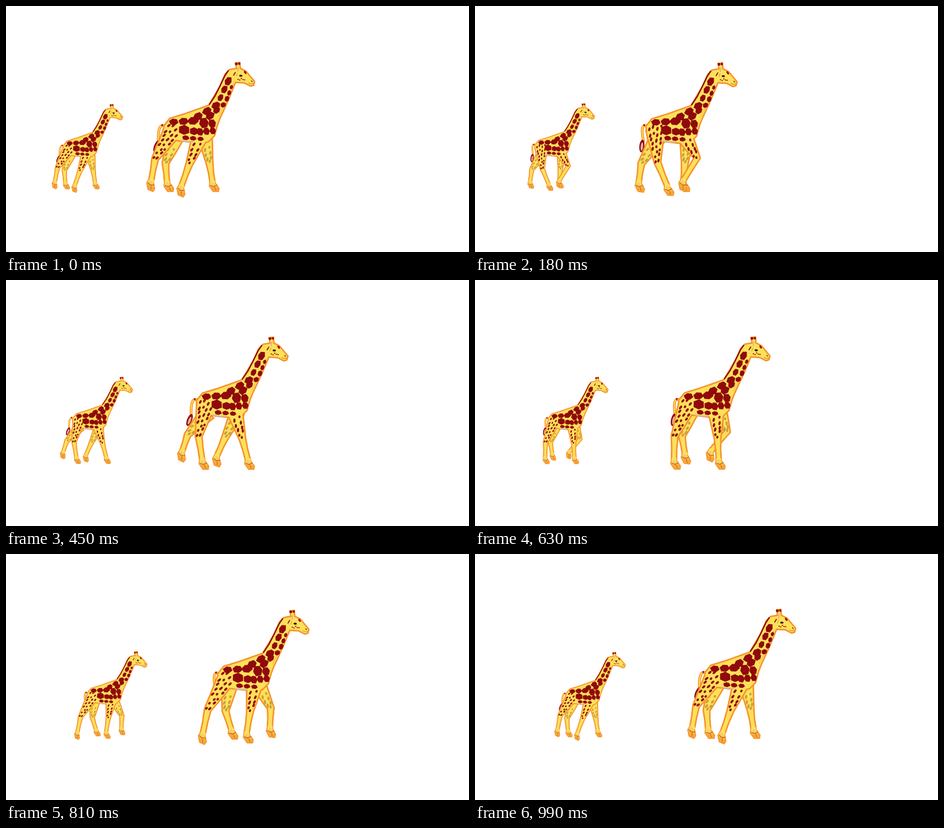
Recreate the animation shown at these times as an HTML page with a canvas. Size 842x448 px, loop 1.08 s.

```html
<!DOCTYPE html>
<html lang="en">
<head>
<meta charset="utf-8">
<title>Walking giraffes</title>
<style>
html, body { margin: 0; width: 100%; height: 100%; overflow: hidden; background: #fff; }
canvas { display: block; }
</style>
</head>
<body>
<canvas id="stage" width="842" height="448"></canvas>
<script>
const ctx = document.getElementById('stage').getContext('2d');
const STEP = 90, STEPS = 12, STRIDE = 11, STANCE = 7;
const YELLOW = '#fde05a', ORANGE = '#f6922b', RED = '#900a0c', DIM = '#c9a040', SHADE = '#f9bd45';
const { PI, sin, cos, atan2, hypot, max, min } = Math;

// Silhouette of head, neck and torso, clockwise from the horns.
const BODY = [
  [416, 103], [426, 102], [427, 113], [437, 118], [453, 137], [451, 145], [445, 147], [433, 141],
  [418, 140], [405, 172], [390, 205], [385, 218], [380, 237], [369, 248], [356, 251], [320, 247],
  [290, 244], [286, 218], [297, 204], [326, 195], [368, 180], [388, 146], [398, 123], [406, 115], [418, 113]];

const mix = (a, b, k) => a + (b - a) * k;
const noise = n => { const v = sin(n * 12.9898 + 4) * 43758.5453; return (v - Math.floor(v)) * 2 - 1; };

function polygon(pts) {
  const path = new Path2D();
  pts.forEach(p => path.lineTo(...p));
  path.closePath();
  return path;
}

// Moves every edge of a clockwise polygon inwards by d.
function inset(pts, d) {
  const n = pts.length;
  const normal = (p, q) => {
    const len = hypot(q[0] - p[0], q[1] - p[1]);
    return [(p[1] - q[1]) / len, (q[0] - p[0]) / len];
  };
  return pts.map((p, i) => {
    const a = normal(pts[(i + n - 1) % n], p), b = normal(p, pts[(i + 1) % n]);
    const k = d / max(.6, 1 + a[0] * b[0] + a[1] * b[1]);
    return [p[0] + (a[0] + b[0]) * k, p[1] + (a[1] + b[1]) * k];
  });
}

// Shapes share one orange rim and a yellow inside.
function rimmed(shapes) {
  ctx.fillStyle = ctx.strokeStyle = ORANGE;
  ctx.lineWidth = 1;
  for (const s of shapes) {
    const path = polygon(s);
    ctx.fill(path);
    ctx.stroke(path);
  }
  ctx.fillStyle = YELLOW;
  shapes.forEach(s => ctx.fill(polygon(inset(s, 2.2))));
}

function line(pts, color, width) {
  ctx.beginPath();
  pts.forEach(p => ctx.lineTo(...p));
  ctx.strokeStyle = color;
  ctx.lineWidth = width;
  ctx.stroke();
}

function oval(x, y, rx, ry, tilt, color) {
  ctx.beginPath();
  ctx.ellipse(x, y, rx, ry, tilt, 0, 7);
  ctx.fillStyle = color;
  ctx.fill();
}

// A blotch with soft, uneven corners.
function blotch(x, y, rx, ry, tilt, seed) {
  const n = 6, pts = [];
  for (let i = 0; i < n; i++) {
    const t = i / n * PI * 2 + seed, r = 1.15 + .12 * noise(seed + i);
    const u = cos(t) * rx * r, v = sin(t) * ry * r;
    pts.push([x + u * cos(tilt) - v * sin(tilt), y + u * sin(tilt) + v * cos(tilt)]);
  }
  const path = polygon(pts);
  ctx.fillStyle = ctx.strokeStyle = RED;
  ctx.lineWidth = 1.2;
  ctx.fill(path);
  ctx.stroke(path);
}

// A row of blotches between two points, growing from size r0 to r1.
function row(x0, y0, x1, y1, n, r0, r1, aspect) {
  const tilt = atan2(y1 - y0, x1 - x0);
  for (let i = 0; i < n; i++) {
    const t = i / (n - 1), r = mix(r0, r1, t);
    blotch(mix(x0, x1, t), mix(y0, y1, t), r, r * aspect, tilt, x0 + i);
  }
}

// Each foot slides back while planted, then swings forward.
function makeLeg(step, kind, near, touch) {
  const hind = kind === 'hind';
  const age = (step - touch + STRIDE) % STRIDE;
  const q = max(0, (age - STANCE) / (STRIDE - STANCE)), lift = sin(PI * q);
  const front = hind ? 326 : 391, back = hind ? 260 : 319;
  const ax = age < STANCE ? mix(front, back, age / STANCE) : mix(back, front, hind ? q ** 4 : q);
  const ay = (near ? 328 : 321) - 10 * lift;
  const turn = 28 * sin(PI * max(0, (age - 5) / (STRIDE - 5)));

  const bob = 1.4 * sin(PI * step / STRIDE);
  const hx = hind ? (near ? 304 : 308) : (near ? 355 : 362);
  const hy = (hind ? (near ? 225 : 240) : (near ? 232 : 238)) + bob;
  const kx = mix(hx, ax, .6) + (hind ? -9 : 25 * lift);
  const ky = mix(hy, ay, .58) - (hind ? 0 : 5 * lift);
  const top = (hind ? 36 : 33) - (near ? 0 : 5), knee = 14;

  const a1 = atan2(ky - hy, kx - hx), a2 = atan2(ay - ky, ax - kx);
  const joints = [[hx, hy, a1, top], [mix(hx, kx, .6), mix(hy, ky, .6), a1, mix(top, knee, .6)],
    [kx, ky, (a1 + a2) / 2, knee], [mix(kx, ax, .5), mix(ky, ay, .5), a2, 11], [ax, ay, a2, 11]];
  const side = s => joints.map(([x, y, a, w]) => [x - sin(a) * w / 2 * s, y + cos(a) * w / 2 * s]);
  return { hx, hy, kx, ky, ax, ay, turn, top, knee, a1, shape: [...side(-1), ...side(1).reverse()] };
}

function legSpots(leg, color, rows, cols, from) {
  for (let r = 0; r < rows; r++) {
    const t = mix(from, .95, r / (rows - 1)), w = mix(leg.top, leg.knee, t);
    const n = max(1, Math.round(cols * (1 - t * .6)));
    for (let c = 0; c < n; c++) {
      const seed = r * 7 + c;
      const k = t + .035 * noise(seed) + (c % 2) * .06;
      const u = ((c + .5) / n - .5) * w * .8 + noise(seed + 40);
      oval(mix(leg.hx, leg.kx, k) - sin(leg.a1) * u, mix(leg.hy, leg.ky, k) + cos(leg.a1) * u,
        3.3 + .7 * noise(seed + 80), 2, leg.a1 + .3, color);
    }
  }
}

function hoof(leg) {
  ctx.save();
  ctx.translate(leg.ax, leg.ay);
  ctx.rotate(leg.turn * PI / 180);
  const shape = polygon([[-4, -4], [-6, 7], [1, 17], [11, 17], [12, 11], [5, 2], [4, -4]]);
  const fade = ctx.createLinearGradient(0, 2, 0, 11);
  fade.addColorStop(0, YELLOW);
  fade.addColorStop(1, '#f9a637');
  ctx.fillStyle = fade;
  ctx.fill(shape);
  line([[-5, 0], [-6, 7], [1, 17], [11, 17], [12, 11], [5, 1]], ORANGE, 1.6);
  line([[-4, 6], [2, 8], [8, 5]], '#a8502a', 1.1);
  line([[4, 9], [6, 15]], '#c4611c', 1);
  oval(0, 2, 2.2, 1.8, 0, '#e9c79a');
  ctx.restore();
}

function tail(step) {
  const x = 277.5 - 3.5 * cos(4 * PI * step / STRIDE), tilt = (282 - x) * .05;
  ctx.beginPath();
  ctx.moveTo(288, 218);
  ctx.quadraticCurveTo(276, 214, x + 3, 246);
  for (const [color, width] of [[ORANGE, 5], [YELLOW, 2]]) {
    ctx.strokeStyle = color;
    ctx.lineWidth = width;
    ctx.stroke();
  }
  oval(x, 255, 4.6, 11.5, tilt, RED);
  oval(x, 256, 2.2, 7.5, tilt, '#e5b0a0');
  oval(284, 217, 1.5, 2, 0, RED);
}

function head() {
  oval(419, 105.5, 2.6, 2.4, 0, RED);
  oval(424.2, 105, 2, 2.4, 0, RED);
  line([[422, 112], [421.5, 119]], '#c9a99a', 1.5);
  line([[417, 121], [414, 126]], RED, 1.8);
  oval(435, 121, 1.7, 3.2, -.6, RED);
  line([[421, 123], [419, 128]], '#d98b2b', 1);
  oval(427, 127, 3, 1.8, .1, '#2a1a16');
  for (let i = 0; i < 5; i++) oval(422 + i * 3, 133.5 + 1.7 * sin(i * 2.2), 1.3, 1, 0, RED);
  oval(447, 137, 1.8, 1, .7, '#7c3a16');
  line([[441, 140], [446, 142], [450, 141]], '#c9781f', 1);
}

function coat() {
  line([[404, 118], [398, 127], [389, 146], [380, 164], [370, 179]], RED, 2.4);
  line([[413, 143], [405, 162], [396, 182], [386, 202]], SHADE, 1.2);
  line([[318, 245], [328, 247], [340, 247]], '#d8b79c', 2.6);
  row(305, 211, 340, 209, 3, 6.5, 8, .8);
  row(360, 213, 375, 214, 2, 7.5, 6, 1.1);
  row(324, 225.5, 342, 228, 2, 8.5, 6.5, .95);
  row(353, 229, 376, 227, 3, 5, 4.5, 1.2);
  row(327, 240, 354, 242, 3, 5, 4.5, .7);
  row(349, 201, 382, 181, 3, 8, 7, .75);
  row(371, 200, 395, 180, 3, 7.5, 4.5, .8);
  row(390, 167, 404, 137, 3, 5.5, 7, .75);
  row(402, 169, 410, 148, 3, 4.8, 3, .7);
}

function giraffe(step) {
  const swing = sin(PI * step / STRIDE), lean = .016 * swing, drop = 1.4 * swing;
  const farHind = makeLeg(step, 'hind', false, 7.5), farFront = makeLeg(step, 'front', false, 9.5);
  const nearHind = makeLeg(step, 'hind', true, 2), nearFront = makeLeg(step, 'front', true, 4);

  tail(step);
  for (const leg of [farHind, farFront]) {
    rimmed([leg.shape]);
    legSpots(leg, DIM, 4, 3, .42);
    hoof(leg);
  }

  rimmed([BODY.map(([x, y]) => [x + lean * (225 - y), y + drop]), nearHind.shape, nearFront.shape]);
  ctx.save();
  ctx.transform(1, 0, -lean, 1, lean * 225, drop);
  coat();
  head();
  ctx.restore();

  legSpots(nearHind, RED, 7, 4, -.1);
  legSpots(nearFront, RED, 5, 3, .32);
  hoof(nearHind);
  hoof(nearFront);
}

// The big one walks evenly, slows a little, then catches up.
function bigX(step) {
  if (step < 7) return step * 11.85;
  return step < 9 ? mix(83, 98, (step - 7) / 2) : mix(98, 131, (step - 9) / 2);
}

function draw() {
  const step = Math.floor(performance.now() / STEP) % STEPS;
  ctx.setTransform(1, 0, 0, 1, 0, 0);
  ctx.fillStyle = '#fff';
  ctx.fillRect(0, 0, 842, 448);
  ctx.lineJoin = ctx.lineCap = 'round';
  ctx.setTransform(.655, 0, 0, .655, -84 + 1.6 * step + .36 * step ** 2, 111.8 - 3.3 * sin(PI * step / STRIDE));
  giraffe(step);
  ctx.setTransform(1, 0, 0, 1, bigX(step), -2 * (step / STRIDE) ** 4);
  giraffe(step);
  requestAnimationFrame(draw);
}
draw();
</script>
</body>
</html>
```
